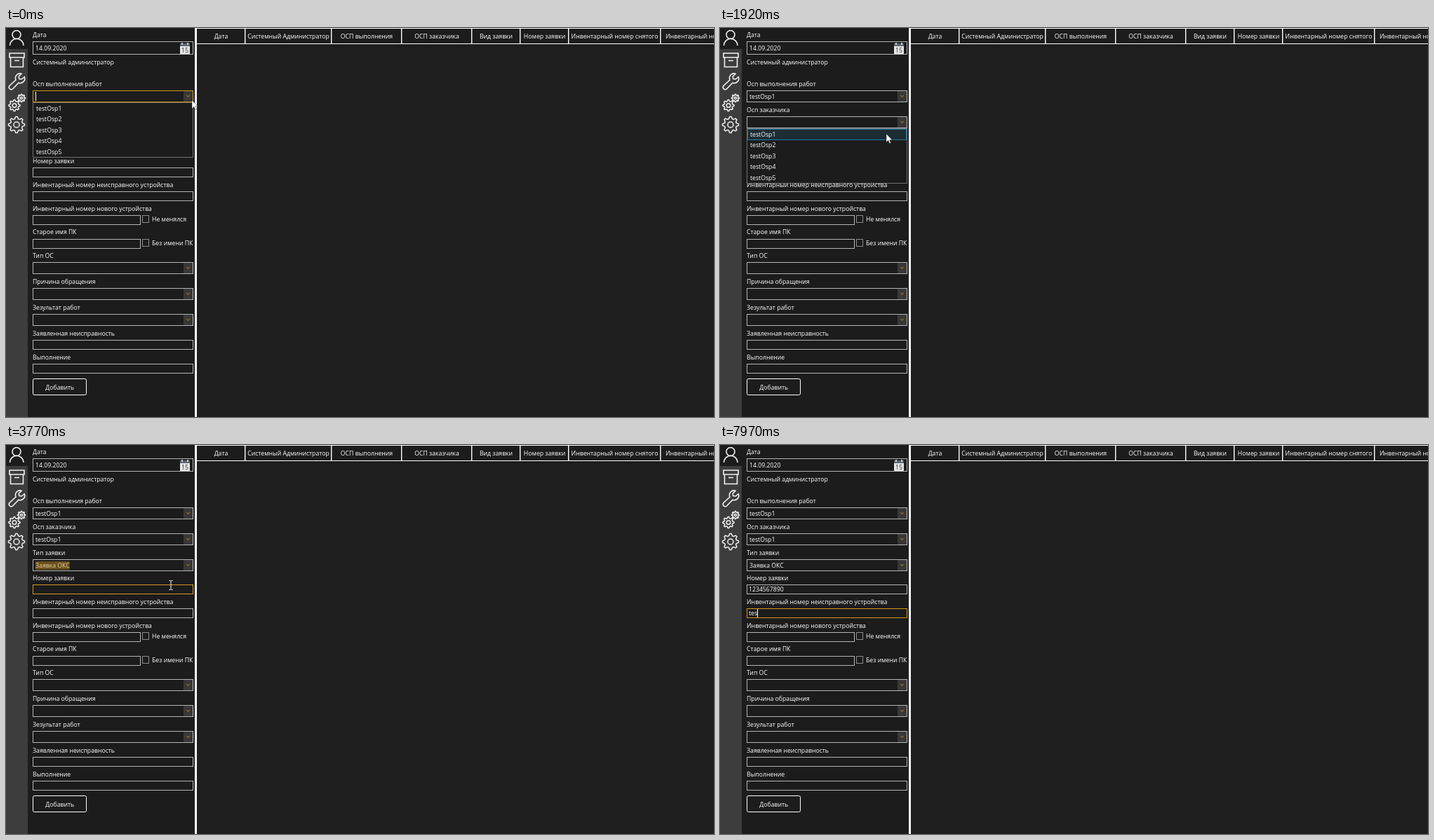
An HTML page with a canvas that plays this animation: 1009x555 px, repeating every 8000 ms.

```html
<!DOCTYPE html>
<html lang="ru">
<head>
<meta charset="utf-8">
<style>
html, body { margin: 0; width: 100%; height: 100%; overflow: hidden; background: #1c1c1c; }
canvas { display: block; }
</style>
</head>
<body>
<canvas id="stage" width="1009" height="555"></canvas>
<script>
const c = document.getElementById('stage').getContext('2d');
const LOOP = 8000, BG = '#1c1c1c', LINE = '#b4b4b4', ORANGE = '#d2961e';
const OSP = [1, 2, 3, 4, 5].map(n => 'testOsp' + n);
const KINDS = ['Заявка ОКС', 'Инцидент'];

const LABELS = [
  ['Дата', 10], ['Системный администратор', 49], ['Осп выполнения работ', 80],
  ['Осп заказчика', 117], ['Тип заявки', 154], ['Номер заявки', 190],
  ['Инвентарный номер неисправного устройства', 224],
  ['Инвентарный номер нового устройства', 258], ['Старое имя ПК', 291],
  ['Тип ОС', 325], ['Причина обращения', 362], ['Зезультат работ', 399],
  ['Заявленная неисправность', 436], ['Выполнение', 470]
];

const HEADERS = [
  ['Дата', 272, 341], ['Системный Администратор', 341, 464], ['ОСП выполнения', 464, 564],
  ['ОСП заказчика', 564, 664], ['Вид заявки', 664, 733], ['Номер заявки', 733, 802],
  ['Инвентарный номер снятого', 802, 933], ['Инвентарный номер нового', 933, 1068]
];

// open: list shown; pick: item chosen; next: selection dropped; hover: first row lit
const COMBOS = [
  { y: 89, items: OSP, open: 0, pick: 690, next: 1380, hover: 200, caretOff: 690 },
  { y: 126, items: OSP, open: 1380, pick: 2200, next: 2780, hover: 1850, caretOff: 1910 },
  { y: 163, items: KINDS, open: 2780, pick: 3560, next: 4090, hover: 3255, caretOff: 3300 }
];

const FIELDS = [
  { y: 199, text: '1234567890', focus: 4090, blur: 7260,
    keys: [4640, 4880, 5030, 5270, 5550, 5760, 6010, 6260, 6540, 6790] },
  { y: 233, text: 'tes', focus: 7260, blur: LOOP, keys: [7820, 7890, 7970] }
];

// Pointer path: time, x, y
const PATH = [
  [0, 265, 103], [30, 265, 103], [310, 253, 117], [1020, 253, 117], [1280, 261, 133],
  [1540, 260, 137], [1690, 260, 137], [1920, 237, 151], [2410, 237, 151],
  [2720, 261, 169], [2860, 260, 171], [3200, 241, 183], [3230, 241, 183],
  [3310, 238, 191], [3560, 238, 191], [3880, 234, 204], [4340, 234, 204],
  [4360, 237, 204], [6850, 237, 204], [7110, 199, 241], [LOOP, 199, 241]
];

function pointer(t) {
  const i = PATH.findIndex(p => p[0] > t);
  const a = PATH[i - 1], b = PATH[i], k = (t - a[0]) / (b[0] - a[0]);
  return { x: a[1] + (b[1] - a[1]) * k, y: a[2] + (b[2] - a[2]) * k };
}

function rect(x, y, w, h, color) {
  c.fillStyle = color;
  c.fillRect(x, y, w, h);
}

function frame(x, y, w, h, color = LINE) {
  c.strokeStyle = color;
  c.lineWidth = 1;
  c.strokeRect(x + .5, y + .5, w - 1, h - 1);
}

function text(s, x, mid, align = 'left') {
  c.textAlign = align;
  c.fillStyle = '#fff';
  c.fillText(s, x, mid + 3);
}

function stroke(d, color = '#f2f2f2', width = 1.6) {
  c.strokeStyle = color;
  c.lineWidth = width;
  c.stroke(new Path2D(d));
}

function ring(x, y, r) {
  c.beginPath();
  c.arc(x, y, r, 0, 7);
  c.stroke();
}

function gear(x, y, outer, inner, hole, teeth) {
  c.beginPath();
  for (let i = 0; i < teeth * 4; i++) {
    const a = (i - .5) * Math.PI / teeth / 2 - Math.PI / 2;
    const r = i % 4 < 2 ? outer : inner;
    c.lineTo(x + r * Math.cos(a), y + r * Math.sin(a));
  }
  c.closePath();
  c.strokeStyle = '#f2f2f2';
  c.lineWidth = 1.5;
  c.stroke();
  ring(x, y, hole);
}

function sidebar() {
  rect(0, 30, 31, 525, '#3d3d3d');
  stroke('M5.5 25A9.6 9.6 0 0 1 25 25');
  ring(15, 9.5, 6);
  stroke('M5 36H26V42H5ZM6.5 42V55.5H24.5V42M12 46.5H19');
  stroke('M22 65.3A6.5 6.5 0 0 0 14 74L5 82.5A3.2 3.2 0 0 0 9.5 87L18 78.3' +
    'A6.5 6.5 0 0 0 26.2 69.7L22.3 73L18.7 72.6L18.2 69.3Z');
  gear(12, 110.5, 8, 6, 2.8, 8);
  gear(22, 100, 5.5, 4, 1.6, 8);
  gear(15, 138, 11.5, 8.7, 4, 8);
}

function combo(y, hot) {
  rect(253, y + 1, 13, 15, '#383838');
  frame(38, y, 229, 17, hot ? ORANGE : LINE);
  stroke(`M257.3 ${y + 7.2}L259.5 ${y + 9.2}L261.7 ${y + 7.2}`, ORANGE, 1);
}

function calendar() {
  rect(248, 22, 14, 15, '#e4e4e4');
  rect(248, 22, 14, 4, '#5d6670');
  rect(250, 21, 2, 3, '#ccc');
  rect(258, 21, 2, 3, '#ccc');
  c.fillStyle = '#333';
  c.textAlign = 'center';
  c.fillText('15', 255, 34.5);
}

function table() {
  rect(272, 0, 737, 1, '#fff');
  rect(272, 22, 737, 1, '#fff');
  for (const [name, left, right] of HEADERS) {
    rect(right - 1, 0, 1.4, 23, '#fff');
    text(name, (left + right) / 2, 12, 'center');
  }
  rect(269, 0, 3, 555, '#fff');
}

function form() {
  for (const [s, y] of LABELS) text(s, 38, y);
  frame(38, 19, 229, 19);
  text('14.09.2020', 42, 28.5);
  calendar();
  for (const y of [334, 371, 408]) combo(y);
  for (const y of [445, 479]) frame(38, y, 229, 14);
  [[267, 'Не менялся'], [301, 'Без имени ПК']].forEach(([y, s]) => {
    frame(38, y, 154, 14);
    frame(194, y, 10, 11, '#8a8a8a');
    text(s, 208, y + 6);
  });
  c.strokeStyle = '#fff';
  c.lineWidth = 1;
  c.beginPath();
  c.roundRect(38.5, 500.5, 76, 23, 2);
  c.stroke();
  text('Добавить', 76.7, 512.5, 'center');
}

function drawCombo(b, t, p) {
  const hot = p.y >= b.y && p.y < b.y + 17;
  combo(b.y, hot);
  if (t < b.pick) {
    if (t >= b.open && t < b.caretOff) rect(42, b.y + 2, 1, 13, '#fff');
    return;
  }
  text(b.items[0], 42, b.y + 8.7);
  if (t < b.next) rect(42, b.y + 3, c.measureText(b.items[0]).width, 12, 'rgba(210,150,30,.42)');
}

function drawList(b, t) {
  if (t < b.open || t >= b.pick) return;
  const top = b.y + 17, h = b.items.length * 15.4 + 1.5;
  rect(38, top, 229, h, BG);
  frame(38, top, 229, Math.round(h), '#707070');
  if (t >= b.hover) {
    rect(39, top + 1, 227, 16, 'rgba(38,160,218,.12)');
    frame(39, top + 1, 227, 16, 'rgba(38,160,218,.66)');
  }
  b.items.forEach((s, i) => text(s, 43, b.y + 26 + i * 15.4));
}

function drawField(f, t, p) {
  const focused = t >= f.focus && t < f.blur;
  const hot = p.y >= f.y && p.y < f.y + 14;
  frame(38, f.y, 229, 14, focused || hot ? ORANGE : LINE);
  const typed = f.text.slice(0, f.keys.filter(k => t >= k).length);
  text(typed, 41, f.y + 7.3);
  if (focused) rect(Math.round(41 + c.measureText(typed).width), f.y + 1, 1, 12, '#fff');
}

function drawPointer(t, { x, y }) {
  if (t >= 4640 && t < 6850 || t >= 7820) return;
  const inField = t > 3560 && FIELDS.some(f => y >= f.y && y < f.y + 14);
  c.save();
  c.translate(Math.round(x), Math.round(y));
  if (inField) {
    stroke('M-2.5 -6.5H-.5M.5 -6.5H2.5M0 -6V6M-2.5 6.5H-.5M.5 6.5H2.5', '#fff', 1);
  } else {
    const arrow = new Path2D('M0 0V12L2.8 9.5L4.6 13.8L6.5 13L4.7 8.8H8.4Z');
    c.fillStyle = '#fff';
    c.fill(arrow);
    c.strokeStyle = '#000';
    c.lineWidth = .4;
    c.stroke(arrow);
  }
  c.restore();
}

function draw(now) {
  const t = now % LOOP, p = pointer(t);
  c.font = '8.7px "Open Sans", "Noto Sans", sans-serif';
  rect(0, 0, 1009, 555, BG);
  rect(272, 23, 737, 532, '#1e1e1e');
  sidebar();
  form();
  FIELDS.forEach(f => drawField(f, t, p));
  COMBOS.forEach(b => drawCombo(b, t, p));
  COMBOS.forEach(b => drawList(b, t));
  table();
  drawPointer(t, p);
}

const start = performance.now();
function tick() {
  draw(performance.now() - start);
  requestAnimationFrame(tick);
}
tick();
</script>
</body>
</html>
```
